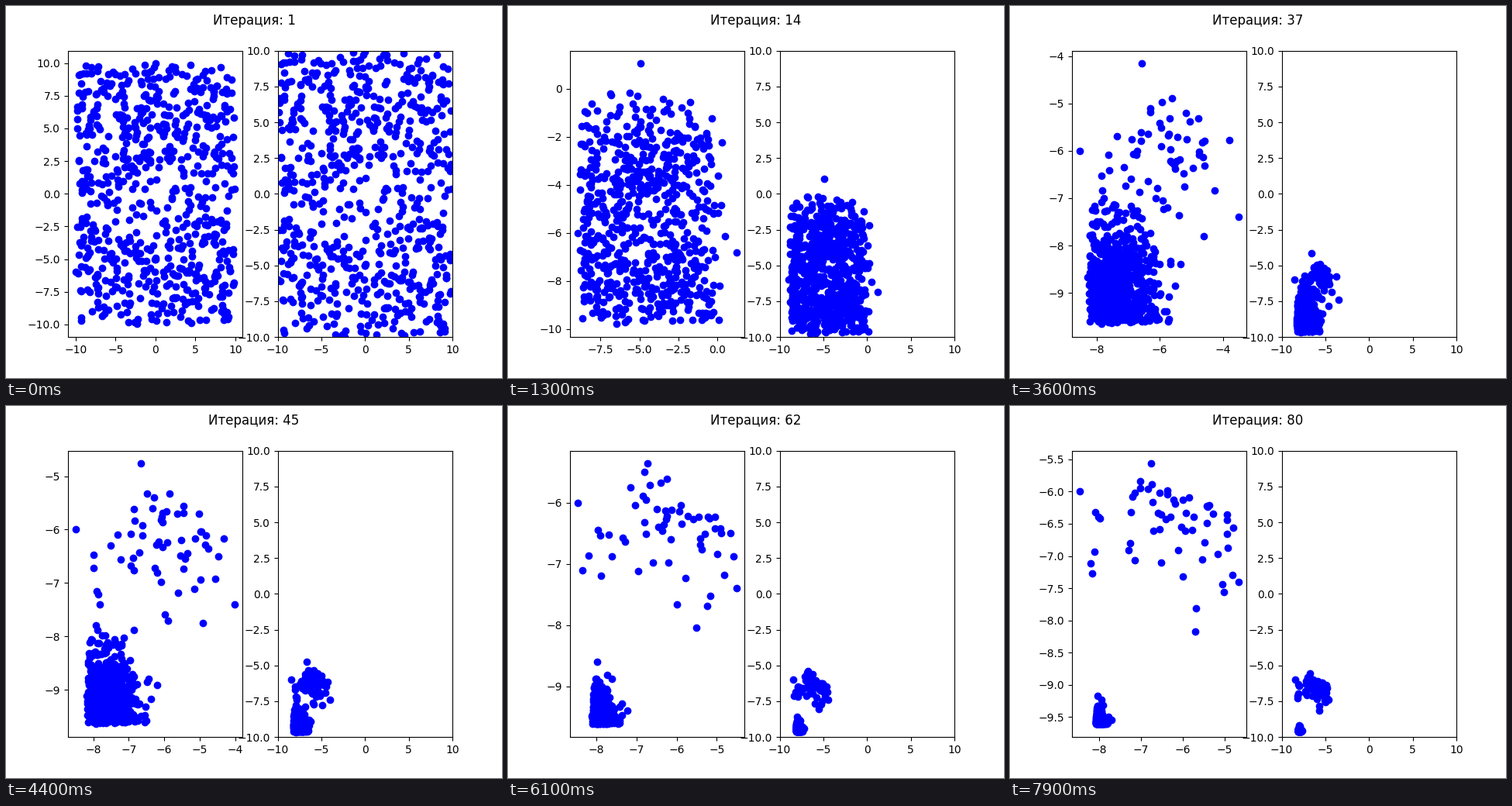
Animation of 640x480 px, one loop 8000 ms. Source, as a matplotlib script:

```python
import numpy as np
import matplotlib.pyplot as plt
from matplotlib.animation import FuncAnimation

STEPS, INTERVAL = 80, 100
SWARM, STRAYS, WALL = 600, 50, 6
GOAL = np.array([-8.05, -9.61])
rng = np.random.default_rng(7)


def ease(first, last, rate, step):
    """Exponential approach from first to last."""
    return last + (first - last) * np.exp(-rate * step)


def random_start(n):
    """Uniform cloud, thinner around y = 0."""
    p = rng.uniform(-9.9, 9.9, (n, 2))
    thin = (abs(p[:, 1]) < 2) & (rng.random(n) < 0.4)
    p[thin, 1] = rng.uniform(-9.9, 9.9, thin.sum())
    return p


def hover_places():
    """Loose cloud with a tail downwards, and a few points at the left."""
    x = rng.uniform(-7.3, -4.75, STRAYS)
    y = -5.75 - 0.25 * (x + 7.3) - rng.exponential(0.7, STRAYS)
    wall = np.column_stack([rng.normal(-8.1, 0.1, WALL),
                            rng.uniform(-7.8, -6.1, WALL)])
    return np.vstack([np.column_stack([x, y.clip(-9.5)]), wall])


swarm_start = random_start(SWARM)
swarm_rates = rng.normal(0.068, 0.008, (SWARM, 2))
hover = hover_places()
hover_start = random_start(len(hover))
walk = rng.normal(0, 0.04, (STEPS, len(hover), 2)).cumsum(axis=0)
walk -= walk[-1]


def positions(step):
    left = ease(-9.97, -8.45, 0.085, step)
    right = ease(9.94, -4.72, 0.069, step)
    top = ease(9.95, -5.66, 0.065, step)
    bottom = ease(-9.97, -9.60, 0.05, step)
    edge = [(left, -6), (right, ease(0.35, -7.4, 0.2, step)),
            (ease(0, -6.75, 0.1, step), top),
            (ease(-2.35, -8, 0.1, step), bottom)]

    swarm = ease(swarm_start, GOAL, swarm_rates, step)
    strays = ease(hover_start, hover, 0.075, step) + walk[step]
    pts = np.vstack([swarm, strays])
    # Reflect at the shrinking box
    lo, hi = np.array([left, bottom]), np.array([right, top])
    pts = hi - abs(hi - pts)
    pts = lo + abs(pts - lo)
    return np.vstack([pts, edge])


fig, (near, full) = plt.subplots(1, 2, figsize=(6.4, 4.8), dpi=100)
title = fig.suptitle("")
dots = [ax.plot([], [], "bo")[0] for ax in (near, full)]
full.set(xlim=(-10, 10), ylim=(-10, 10))


def update(step):
    pts = positions(step)
    for d in dots:
        d.set_data(*pts.T)
    lo, hi = pts.min(axis=0), pts.max(axis=0)
    pad = 0.05 * (hi - lo)
    (x0, y0), (x1, y1) = lo - pad, hi + pad
    near.set(xlim=(x0, x1), ylim=(y0, y1))
    title.set_text(f"Итерация: {step + 1}")
    return [*dots, title]


anim = FuncAnimation(fig, update, frames=STEPS, interval=INTERVAL,
                     repeat=True, repeat_delay=0, blit=False)
plt.show()
```
